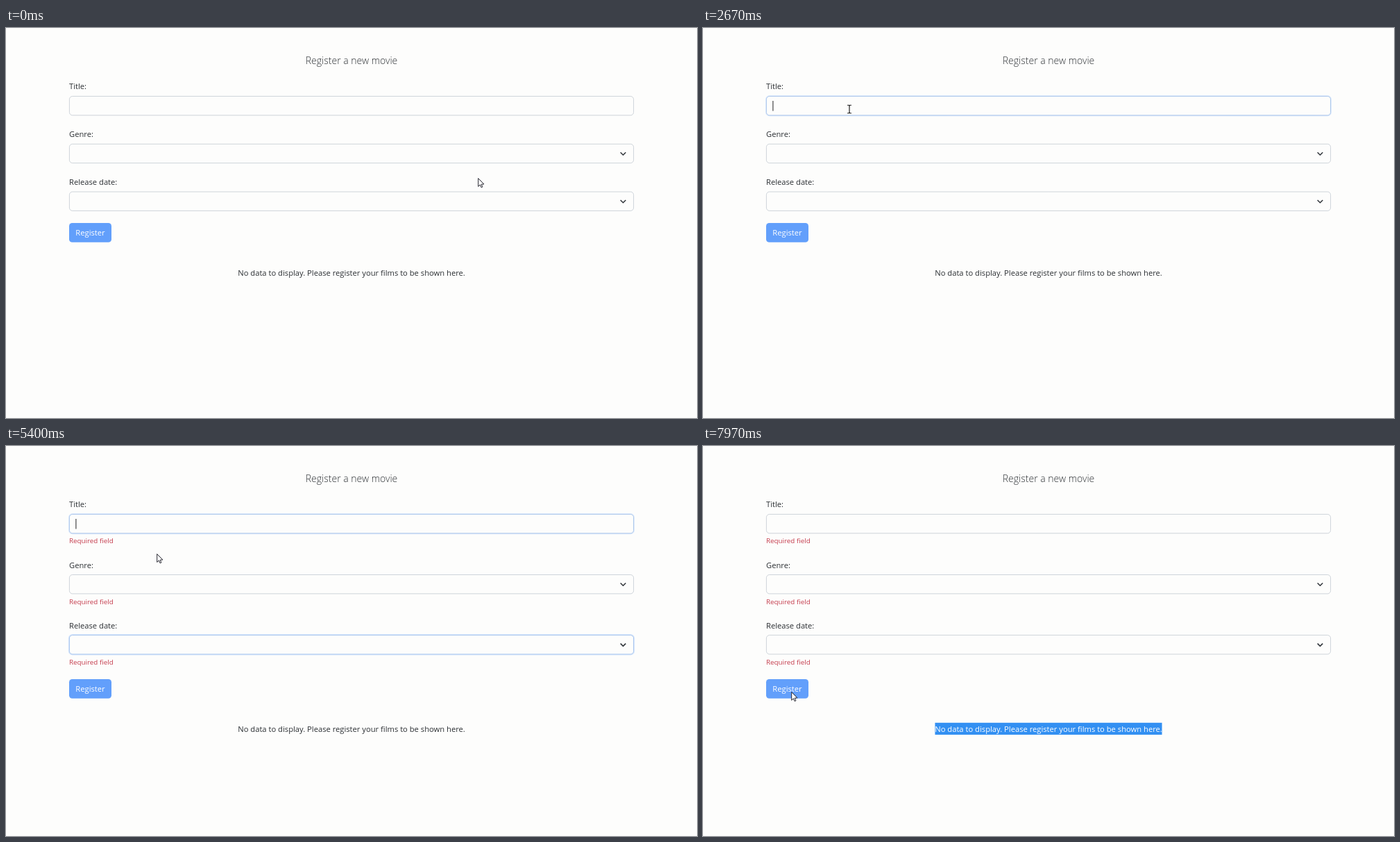
An HTML page with a canvas that plays this animation: 996 by 562 pixels, repeating every 8 s.

```html
<!DOCTYPE html>
<html lang="en">
<head>
<meta charset="utf-8">
<title>Register a new movie</title>
<style>
html, body { margin: 0; width: 100%; height: 100%; overflow: hidden; background: #fdfdfc; }
canvas { display: block; width: 996px; height: 562px; }
</style>
</head>
<body>
<canvas id="stage" width="996" height="562"></canvas>
<script>
const ctx = document.getElementById('stage').getContext('2d');
const LOOP = 8000, FADE = 150, BLINK = 530, ERROR_H = 18.3;
const LEFT = 91.4, WIDTH = 813.2, HEIGHT = 27.4;
const INK = '#2b2f33';
const MESSAGE = 'No data to display. Please register your films to be shown here.';

// focus: [start, end] spans; error: when the hint appears
const fields = [
  { label: 'Title:', focus: [[2600, 3400], [5330, 7200]], error: 3400 },
  { label: 'Genre:', focus: [[3400, 4200]], error: 4200, select: true },
  { label: 'Release date:', focus: [[4200, 5330]], error: 5330, select: true }
];

// time, x, y
const path = [
  [30, 680, 216], [900, 264, 97], [1600, 225, 108], [2470, 211, 116],
  [2670, 211, 117], [3330, 211, 121], [3800, 211, 121], [4030, 207, 139],
  [4450, 207, 139], [5000, 217, 155], [5420, 217, 155], [5890, 204, 325],
  [6100, 200, 375], [6300, 200, 375], [6900, 113, 336], [7100, 113, 338],
  [7470, 127, 354]
];

const clamp = v => Math.max(0, Math.min(1, v));
const ease = v => v * v * (3 - 2 * v);
const mix = (a, b, k) => a + (b - a) * k;

function text(str, x, y, size, color, align = 'left', weight = 400) {
  ctx.font = `${weight} ${size}px "Open Sans", "Noto Sans", sans-serif`;
  ctx.textAlign = align;
  ctx.fillStyle = color;
  ctx.fillText(str, x, y);
}

function box(x, y, w, h, r) {
  ctx.beginPath();
  ctx.roundRect(x, y, w, h, r);
}

function line(points, color, width) {
  ctx.beginPath();
  points.forEach(([x, y]) => ctx.lineTo(x, y));
  ctx.strokeStyle = color;
  ctx.lineWidth = width;
  ctx.stroke();
}

function focusLevel(spans, t) {
  return Math.max(...spans.map(([a, b]) =>
    ease(clamp((t - a) / FADE)) * (1 - ease(clamp((t - b) / FADE)))));
}

function drawField(field, y, t) {
  text(field.label, 91, y - 10, 11.2, INK);
  const k = focusLevel(field.focus, t);
  if (k > 0) {
    const s = 3 * k;
    box(LEFT - s, y - s, WIDTH + 2 * s, HEIGHT + 2 * s, 4.4 + s);
    ctx.fillStyle = `rgba(13,110,253,${0.27 * k})`;
    ctx.fill();
  }
  box(LEFT, y, WIDTH, HEIGHT, 4.4);
  ctx.fillStyle = '#fdfdfc';
  ctx.fill();
  ctx.strokeStyle = `rgb(${mix(206, 134, k)},${mix(212, 183, k)},${mix(218, 254, k)})`;
  ctx.lineWidth = 1;
  ctx.stroke();
  if (field.select) {
    line([[885.7, y + 12], [889.5, y + 15.8], [893.3, y + 12]], '#30353a', 1.5);
  } else if (field.focus.some(([a, b]) => t >= a && t < b && (t - a) % (2 * BLINK) < BLINK)) {
    ctx.fillStyle = '#222';
    ctx.fillRect(100.4, 105, 1, 14.5);
  }
}

function drawForm(t) {
  text('Register a new movie', 498, 52, 14, INK, 'center', 300);
  let shift = 0;
  fields.forEach((field, i) => {
    const y = 98.4 + 68.8 * i + shift;
    drawField(field, y, t);
    if (t >= field.error) {
      text('Required field', 91, y + 42, 9.8, '#c43a4b');
      shift += ERROR_H;
    }
  });
  box(91, 281 + shift, 61, 27.8, 4.4);
  ctx.fillStyle = '#629ffb';
  ctx.fill();
  text('Register', 121.5, 299 + shift, 11.2, '#fff', 'center');
  drawMessage(357 + shift, t);
}

function drawMessage(y, t) {
  text(MESSAGE, 498, y, 11.2, INK, 'center');
  if (t < 7740) return;
  const full = ctx.measureText(MESSAGE).width;
  const x = 498 - full / 2;
  const w = t < 7900 ? ctx.measureText('No ').width : full;
  ctx.save();
  ctx.beginPath();
  ctx.rect(x, y - 13.3, w, 17.6);
  ctx.clip();
  ctx.fillStyle = '#3390f2';
  ctx.fillRect(x, y - 13.3, w, 17.6);
  text(MESSAGE, 498, y, 11.2, '#fff', 'center');
  ctx.restore();
}

function pointerAt(t) {
  const i = path.findIndex(p => p[0] > t);
  if (i === 0) return path[0].slice(1);
  if (i < 0) return path[path.length - 1].slice(1);
  const [a, ax, ay] = path[i - 1], [b, bx, by] = path[i];
  const k = ease((t - a) / (b - a));
  return [mix(ax, bx, k), mix(ay, by, k)];
}

function drawPointer(t) {
  const [x, y] = pointerAt(t);
  ctx.save();
  ctx.translate(x, y);
  if (y > 98 && y < 126) {
    line([[0, -5], [0, 5]], '#222', 1.2);
    for (const s of [-1, 1]) line([[-3, 5.7 * s], [-0.6, 5.7 * s], [0, 5 * s], [0.6, 5.7 * s], [3, 5.7 * s]], '#222', 1.1);
  } else {
    ctx.translate(0.7, 0.6);
    ctx.beginPath();
    for (const [px, py] of [[0, 0], [0, 11.8], [2.7, 9.3], [4.4, 13.2], [6.2, 12.4], [4.5, 8.6], [8.2, 8.4]]) ctx.lineTo(px, py);
    ctx.closePath();
    ctx.fillStyle = '#fff';
    ctx.fill();
    ctx.strokeStyle = '#25252f';
    ctx.lineWidth = 1;
    ctx.stroke();
  }
  ctx.restore();
}

const start = performance.now();
function frame(now) {
  const t = Math.max(0, now - start) % LOOP;
  ctx.fillStyle = '#fdfdfc';
  ctx.fillRect(0, 0, 996, 562);
  drawForm(t);
  drawPointer(t);
  requestAnimationFrame(frame);
}
requestAnimationFrame(frame);
</script>
</body>
</html>
```
